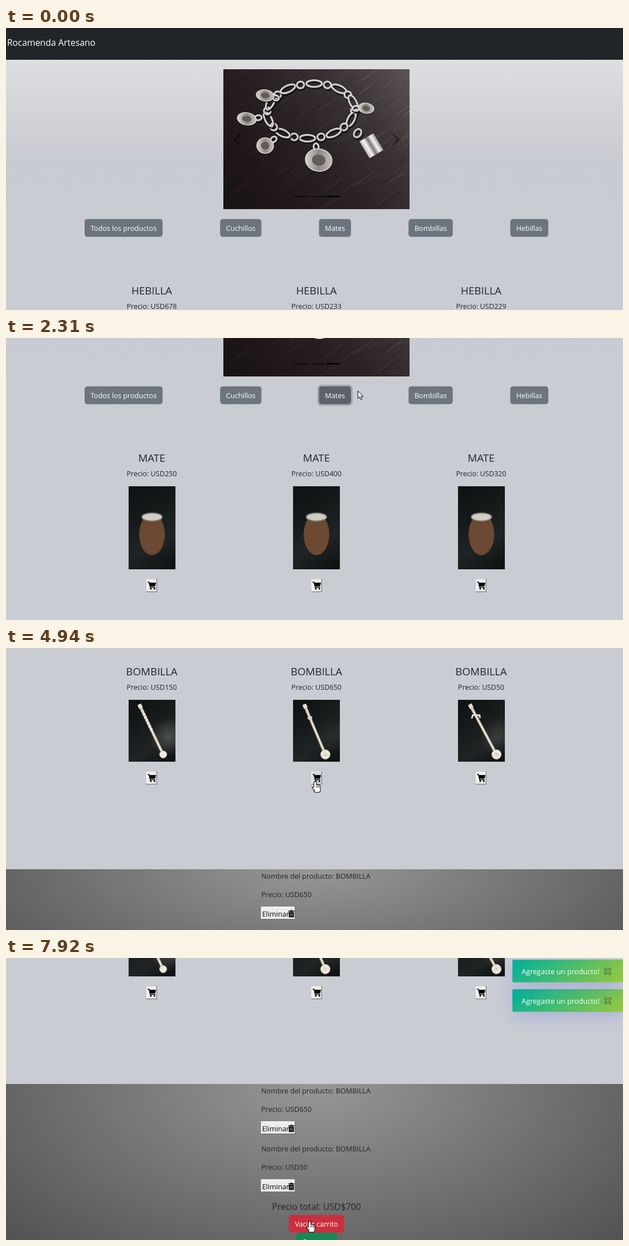
An HTML page with a canvas that plays this animation: 1107x506 px, repeating every 7.99 s.

```html
<!DOCTYPE html>
<html lang="es">
<head>
<meta charset="utf-8">
<title>Tienda</title>
<style>
  html, body { margin: 0; width: 100%; height: 100%; overflow: hidden; background: #c9ccd3; }
  canvas { display: block; }
</style>
</head>
<body>
<canvas id="stage" width="1107" height="506"></canvas>
<script>
const ctx = document.getElementById('stage').getContext('2d');
const W = 1107, H = 506, LOOP = 7990, TAU = Math.PI * 2, MID = 557;
const FONT = '"Open Sans", "Noto Sans", sans-serif';
const INK = '#212529', BODY = 12.65, LEAD = 15.85, TITLE = 18.75;
const FOOTER_TOP = 826, ITEM_H = 104, COLUMN = 295.5;

const TABS = ['Todos los productos', 'Cuchillos', 'Mates', 'Bombillas', 'Hebillas'];
const same = h => [h, h, h];
const SECTIONS = [
  { t: 0, name: 'HEBILLA', prices: [678, 233, 229], heights: same(60), photo: buckle },
  { t: 1605, name: 'CUCHILLO', prices: [200, 300, 500], heights: [111, 62, 149], photo: knife },
  { t: 1960, name: 'MATE', prices: [250, 400, 320], heights: same(149), photo: gourd },
  { t: 2650, name: 'BOMBILLA', prices: [150, 650, 50], heights: same(111), photo: straw }
];
const PURCHASES = [{ t: 4860, price: 650 }, { t: 6850, price: 50 }];
const TOAST_DELAY = 30;
// start, duration, distance
const SCROLLS = [[70, 740, 256], [3140, 580, 173], [7390, 500, 171]];
// Pointer stops: arrival time, x, y
const STOPS = [
  [640, 470, 330], [1610, 424, 104], [1745, 583, 91], [2640, 760, 104], [2850, 748, 145],
  [3760, 703, 273], [3890, 590, 453], [4640, 555, 240], [6080, 520, 412], [6450, 885, 300],
  [6850, 853, 236], [6960, 797, 274], [7900, 545, 473]
];
const TRAVEL = 500;

const clamp = v => Math.max(0, Math.min(1, v));
const smooth = v => { v = clamp(v); return v * v * (3 - 2 * v); };
const easeOut = v => 1 - (1 - clamp(v)) ** 3;
const mix = (a, b, p) => a + (b - a) * p;

function random(seed) {
  return () => (seed = (seed * 16807) % 2147483647) / 2147483647;
}

function text(str, x, y, size, color, align = 'center') {
  ctx.font = `${size}px ${FONT}`;
  ctx.fillStyle = color;
  ctx.textAlign = align;
  ctx.fillText(str, x, y);
}

function rect(x, y, w, h, color) {
  ctx.fillStyle = color;
  ctx.fillRect(x, y, w, h);
}

function round(x, y, w, h, r, color) {
  ctx.beginPath();
  ctx.roundRect(x, y, w, h, r);
  ctx.fillStyle = color;
  ctx.fill();
}

function oval(x, y, rx, ry, rot, fill, stroke, width = 1) {
  ctx.beginPath();
  ctx.ellipse(x, y, rx, ry, rot, 0, TAU);
  if (fill) { ctx.fillStyle = fill; ctx.fill(); }
  if (stroke) { ctx.strokeStyle = stroke; ctx.lineWidth = width; ctx.stroke(); }
}

function line(points, color, width) {
  ctx.beginPath();
  points.forEach(([x, y]) => ctx.lineTo(x, y));
  ctx.strokeStyle = color;
  ctx.lineWidth = width;
  ctx.stroke();
}

function poly(points, fill, stroke) {
  ctx.beginPath();
  points.forEach(([x, y]) => ctx.lineTo(x, y));
  ctx.closePath();
  ctx.fillStyle = fill;
  ctx.fill();
  if (stroke) { ctx.strokeStyle = stroke; ctx.lineWidth = 1; ctx.stroke(); }
}

function linear(x0, y0, x1, y1, ...colors) {
  const g = ctx.createLinearGradient(x0, y0, x1, y1);
  colors.forEach((c, i) => g.addColorStop(i / (colors.length - 1), c));
  return g;
}

function at(x, y, draw) {
  ctx.save();
  ctx.translate(x, y);
  draw();
  ctx.restore();
}

function framed(x, y, w, h, draw) {
  at(x, y, () => {
    ctx.beginPath();
    ctx.rect(0, 0, w, h);
    ctx.clip();
    draw();
  });
}

// Pointer
let mouse, hot;

function hover(x, y, w, h) {
  const inside = mouse && mouse.x >= x && mouse.x <= x + w && mouse.y >= y && mouse.y <= y + h;
  if (inside) hot = true;
  return inside;
}

function pointerAt(t) {
  const last = STOPS.length - 1;
  const next = STOPS.findIndex(s => s[0] > t);
  if (next === 0) return null;
  const i = next < 0 ? last : next;
  const [from, to] = [STOPS[i - 1], STOPS[i]];
  const start = Math.max(from[0], to[0] - TRAVEL);
  const p = smooth((t - start) / (to[0] - start));
  return { x: mix(from[1], to[1], p), y: mix(from[2], to[2], p) };
}

function arrow() {
  poly([[.5, .5], [.5, 14], [3.5, 11.2], [5.6, 16], [7.9, 15], [5.8, 10.4], [10, 10.2]], '#fff', '#000');
}

function hand() {
  ctx.beginPath();
  ctx.roundRect(-2, 0, 3.6, 12, 1.8);
  ctx.roundRect(-2, 6, 10.5, 12.5, [2, 3, 3, 3]);
  ctx.moveTo(-2, 10);
  ctx.lineTo(-5, 10.5);
  ctx.lineTo(-1, 17);
  ctx.strokeStyle = '#000';
  ctx.lineWidth = 2;
  ctx.stroke();
  ctx.fillStyle = '#fff';
  ctx.fill();
  for (let x = 1.6; x < 8; x += 2.5) line([[x, 7], [x, 10.5]], '#000', .9);
}

// Photos
function silverRing(x, y, rx, ry, rot) {
  oval(x + 1, y + 2, rx, ry, rot, null, '#080607', 4);
  oval(x, y, rx, ry, rot, null, '#a5a2a2', 3.6);
  oval(x - .5, y - .8, rx, ry, rot, null, '#f2f0ef', 1.4);
}

function wood(w, h) {
  rect(0, 0, w, h, linear(0, h, w, 0, '#191213', '#201819', '#2b2325', '#3d3538', '#5b5356'));
  const rnd = random(41);
  for (let i = 0; i < 260; i++) {
    const x = rnd() * w, y = rnd() * h, len = 8 + rnd() * 32;
    const tone = rnd() < .5 ? '0,0,0' : '165,155,155';
    line([[x, y], [x + len, y - len * .7]], `rgba(${tone},${.05 + rnd() * .16 * x / w})`, .7 + rnd() * 1.5);
  }
}

function bracelet() {
  const w = 334, h = 251, cx = 157, cy = 75, links = 20;
  wood(w, h);
  for (let i = 0; i < links; i++) {
    const a = i / links * TAU, long = i % 2;
    const [c, s] = [Math.cos(a), Math.sin(a)];
    silverRing(cx + 78 * c - 6 * s, cy + 49 * s, long ? 14 : 6.5, 6, Math.atan2(49 * c, -78 * s));
  }
  const charms = [[42, 89, 17, 11], [75, 47, 16, 10], [256, 70, 14, 9], [75, 137, 15, 14], [171, 163, 24, 20]];
  for (const [x, y, rx, ry] of charms) {
    const a = Math.atan2(cy - y, cx - x);
    silverRing(x + (rx + 4) * Math.cos(a), y + (ry + 4) * Math.sin(a), 6, 4.5, a);
    oval(x, y + 2, rx, ry, .15, '#0b0809');
    oval(x, y, rx, ry, .15, linear(x - rx, y, x + rx, y, '#d6d2cf', '#8e8986', '#c2beba'), '#e0dcd9', 1.5);
    oval(x, y, rx * .5, ry * .5, .15, '#625c5b');
  }
  silverRing(241, 115, 6, 8, .6);
  at(265, 137, () => {
    ctx.rotate(-.54);
    rect(-14, -17, 29, 35, linear(-14, 0, 15, 0, '#bbb8b7', '#f6f5f4', '#777374', '#f6f5f4', '#9a9696'));
  });
  for (const [x, dir] of [[30, -1], [304, 1]]) {
    line([[x, 116], [x + 10 * dir, 126], [x, 136]].map(([px, py]) => [px - 0, py]), 'rgba(0,0,0,.6)', 1.8);
  }
  for (let i = 0; i < 3; i++) rect(128 + 28.5 * i, 227, 25, 2.5, i === 2 ? '#000' : 'rgba(0,0,0,.5)');
}

function cloth(h, fold = 0) {
  rect(0, 0, 84, h, linear(0, 0, 84, h, '#0f1213', '#16191a', '#202424', '#0d0f10'));
  const g = ctx.createRadialGradient(72, h * .6, 0, 72, h * .6, 34);
  g.addColorStop(0, `rgba(125,125,118,${fold})`);
  g.addColorStop(1, 'rgba(125,125,118,0)');
  rect(0, 0, 84, h, g);
}

function straw(i) {
  cloth(111, [.5, .12, .3][i]);
  const tip = [19 + i, 8], end = [[62, 58, 69][i], 98];
  const on = p => [mix(tip[0], end[0], p), mix(tip[1], end[1], p)];
  line([on(.1), on(1)], '#8f8678', 5.4);
  line([on(.1), on(1)], '#e9e1d3', 3.2);
  line([on(0), on(.08)], '#e9e1d3', 7);
  line([on(.08), on(.17)], '#d8d0c2', 4.6);
  if (i === 0) {
    for (let p = .2; p < .52; p += .06) oval(...on(p), 3, 1.5, -.5, '#f5eee2');
  } else if (i === 1) {
    oval(...on(.27), 4.2, 3.6, 0, '#d6d0c4');
  } else {
    const [x, y] = on(.24);
    line([[x - 8, y + 4], [x - 6, y - 2], [x + 6, y - 2], [x + 7, y + 3]], '#e3dccf', 3);
  }
  const r = i ? 8.5 : 6.5;
  oval(...end, r, r, 0, '#efeadf', '#b8b1a4');
  for (let k = 1; k < 10 * (i > 0); k++) {
    oval(end[0] + k * .6 * Math.cos(k * 2.4), end[1] + k * .6 * Math.sin(k * 2.4), .7, .7, 0, '#a09a8e');
  }
}

function knife(i, h) {
  cloth(h);
  line([[14, h * .82], [38, h * .53]], '#74553a', 7);
  line([[38, h * .53], [72, h * .15]], '#c9cac8', 5);
}

function gourd(i, h) {
  cloth(h);
  oval(42, h * .58, 23, h * .25, 0, '#6b4933');
  oval(42, h * .37, 18, 7, 0, '#d0cdc6', '#8e8a84', 2);
}

function buckle(i, h) {
  cloth(h);
  oval(42, h / 2, 29, h * .32, 0, '#aaa69e', '#dedbd5', 2);
  oval(42, h / 2, 12, h * .15, 0, '#736c61');
}

// Page parts
function outset(x, y, w, h) {
  const over = hover(x, y, w, h);
  rect(x, y, w, h, '#777');
  rect(x, y, w - 1.5, h - 1.5, '#f8f8f8');
  rect(x + 1.5, y + 1.5, w - 3, h - 3, over ? '#d4d5d8' : '#ececec');
}

function cartButton(x, y) {
  outset(x, y, 19, 23.5);
  at(x + 9.5, y + 11.5, () => {
    line([[-7.5, -6], [-4.8, -6], [-2.6, 3.2], [6, 3.2]], '#000', 1.6);
    poly([[-4.8, -5], [7.6, -5], [6, 1.6], [-3.3, 1.6]], '#000');
    for (const wheel of [-1.6, 4.8]) oval(wheel, 5.8, 1.6, 1.6, 0, '#000');
  });
}

function trash(x, y) {
  rect(x, y + 1, 11, 1.6, '#000');
  rect(x + 3.5, y, 4, 1.5, '#000');
  round(x + .8, y + 3.2, 9.4, 9.6, 1.2, '#000');
  for (let dx = 3; dx < 8; dx += 2.2) rect(x + dx, y + 5, .8, 6, '#ccc');
}

function pillWidth(label) {
  ctx.font = `${BODY}px ${FONT}`;
  return ctx.measureText(label).width + 21.4;
}

function pill(label, x, y, color, dark, focused) {
  const w = pillWidth(label), over = hover(x, y, w, 32);
  if (focused) round(x - 3, y - 3, w + 6, 38, 7, 'rgba(130,138,145,.5)');
  round(x, y, w, 32, 5, over || focused ? dark : color);
  text(label, x + w / 2, y + 21, BODY, '#fff');
}

function tabs(active) {
  const left = 141, right = 973;
  const widths = TABS.map(pillWidth);
  const gap = (right - left - widths.reduce((a, b) => a + b)) / (TABS.length - 1);
  let x = left;
  TABS.forEach((label, i) => {
    pill(label, x, 342.7, '#6c757d', '#5c636a', i === active);
    x += widths[i] + gap;
  });
}

function products(t) {
  const current = SECTIONS.findLastIndex(s => s.t <= t);
  const { t: opened, name, prices, heights, photo } = SECTIONS[current];
  const age = current ? t - opened : Infinity;
  tabs(current || -1);
  prices.forEach((price, i) => {
    const cx = MID + (i - 1) * COLUMN;
    const h = age >= 140 ? heights[i] : 0;
    text(name, cx, 478, TITLE, INK);
    text('Precio: USD' + price, cx, 504, BODY, INK);
    if (age >= 200) framed(Math.round(cx - 42), 522, 84, h, () => photo(i, h));
    cartButton(Math.round(cx - 9.5), 539.5 + h);
  });
}

function footer(t) {
  const items = PURCHASES.filter(p => p.t <= t);
  const h = 91 + ITEM_H * items.length;
  at(W / 2, FOOTER_TOP, () => {
    ctx.scale(W / Math.SQRT2, h * Math.SQRT2);
    const g = ctx.createRadialGradient(0, 0, 0, 0, 0, 1);
    g.addColorStop(0, '#979797');
    g.addColorStop(1, '#505050');
    rect(-Math.SQRT1_2, 0, Math.SQRT2, Math.SQRT1_2, g);
  });
  let y = FOOTER_TOP, total = 0;
  for (const { price } of items) {
    text('Nombre del producto: BOMBILLA', 458, y + 16.5, BODY, INK, 'left');
    text('Precio: USD' + price, 458, y + 50, BODY, INK, 'left');
    outset(457.5, y + 67, 62, 23.5);
    text('Eliminar', 459.5, y + 85, BODY, '#000', 'left');
    trash(506.5, y + 73.5);
    y += ITEM_H;
    total += price;
  }
  text('Precio total: USD$' + total, MID, y + 18, LEAD, INK);
  const centred = (label, top, ...colors) => pill(label, MID - pillWidth(label) / 2, top, ...colors);
  centred('Vaciar carrito', y + 27, '#dc3545', '#c9303f');
  centred('Comprar', y + 59, '#198754', '#157347');
}

function toast(y, alpha) {
  const x = 908.5, w = 199, h = 40.5, d = (w + h) / 4;
  ctx.save();
  ctx.globalAlpha = alpha;
  ctx.shadowColor = 'rgba(77,96,232,.3)';
  ctx.shadowBlur = 30;
  ctx.shadowOffsetY = 8;
  round(x + 3, y + 3, w - 6, h - 6, 2, '#4bbd6c');
  ctx.shadowColor = 'transparent';
  round(x, y, w, h, 2, linear(x + w / 2 - d, y + h / 2 - d, x + w / 2 + d, y + h / 2 + d, '#00b09b', '#96c93d'));
  text('Agregaste un producto!', 925, y + 26, 12.85, '#fff', 'left');
  at(1079.5, y + 21, () => {
    for (const [color, width, r] of [['#53683f', 4.4, 5.4], ['#7fbb58', 2.2, 4.7]]) {
      line([[-r, -r], [r, r]], color, width);
      line([[-r, r], [r, -r]], color, width);
    }
  });
  ctx.restore();
}

// Each new toast drops in and pushes the earlier ones down
function toasts(t) {
  const shown = PURCHASES.map(p => easeOut((t - p.t - TOAST_DELAY) / 400));
  shown.forEach((p, i) => {
    const pushed = shown.slice(i + 1).reduce((a, b) => a + b, 0);
    if (p > 0) toast(mix(-162, 3, p) + 53 * pushed, p);
  });
}

function draw(t) {
  const scroll = Math.round(SCROLLS.reduce((sum, [start, time, dist]) => sum + dist * smooth((t - start) / time), 0));
  const pointer = pointerAt(t);
  mouse = pointer && { x: pointer.x, y: pointer.y + scroll };
  hot = false;
  at(0, -scroll, () => {
    rect(0, scroll, W, H, linear(0, 58, 0, 330, '#dddee0', '#d2d4d8', '#c9cbd2', '#c9ccd3'));
    rect(0, 0, W, 57, INK);
    text('Rocamenda Artesano', 2, 32, LEAD, '#fff', 'left');
    framed(390, 74, 334, 251, bracelet);
    products(t);
    footer(t);
  });
  toasts(t);
  if (pointer) at(pointer.x, pointer.y, hot ? hand : arrow);
}

const begin = performance.now();
function tick() {
  draw((performance.now() - begin) % LOOP);
  requestAnimationFrame(tick);
}
tick();
</script>
</body>
</html>
```
